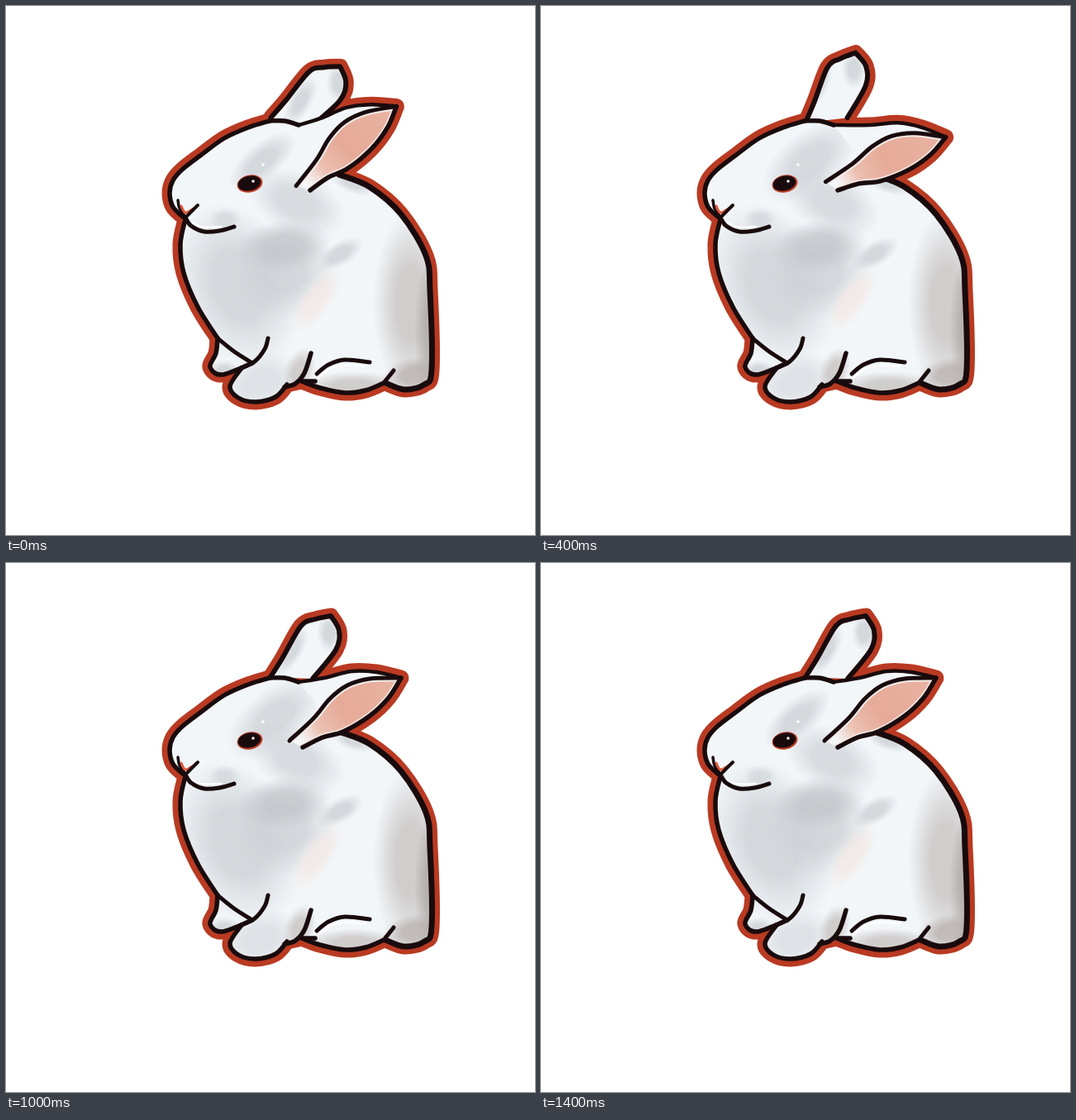
Animation, 640 px wide and 640 px high, one loop 1.6 s. Source, as an HTML page with a canvas:

```html
<!DOCTYPE html>
<html lang="en">
<head>
<meta charset="utf-8">
<title>Rabbit</title>
<style>
html, body { margin: 0; height: 100%; overflow: hidden; background: #fff; }
canvas { display: block; }
</style>
</head>
<body>
<canvas id="stage" width="640" height="640"></canvas>
<script>
const ctx = document.getElementById('stage').getContext('2d');
const INK = '#190b0d', RED = '#b93a22', FUR = '#f2f6f9', SHADE = '#cdd1d5', WARM = '#c8c3c2';
const STEP = 200, SLOTS = 8;

const points = s => s.split(' ').map(p => p.split(',').map(Number));
const reverse = s => s.split(' ').reverse().join(' ');

// Smooth curve through points; "|" marks a corner between curves.
function curve(s) {
  const path = new Path2D();
  s.split('|').forEach((part, n) => {
    const p = points(part), at = i => p[Math.max(0, Math.min(p.length - 1, i))];
    n ? path.lineTo(...p[0]) : path.moveTo(...p[0]);
    for (let i = 0; i < p.length - 1; i++) {
      const [a, b, c, d] = [at(i - 1), at(i), at(i + 1), at(i + 2)];
      path.bezierCurveTo(b[0] + (c[0] - a[0]) / 6, b[1] + (c[1] - a[1]) / 6,
        c[0] - (d[0] - b[0]) / 6, c[1] - (d[1] - b[1]) / 6, ...c);
    }
  });
  return path;
}

// Rotates a curve about a pivot, then shifts it sideways.
function turn(s, [px, py], degrees, shift = 0) {
  const a = degrees * Math.PI / 180, cos = Math.cos(a), sin = Math.sin(a);
  return s.replace(/(\d+),(\d+)/g, (_, x, y) => {
    const u = x - px, v = y - py;
    return `${px + shift + u * cos - v * sin},${py + u * sin + v * cos}`;
  });
}

function line(s, width = 5.5, color = INK) {
  ctx.lineWidth = width;
  ctx.strokeStyle = color;
  ctx.stroke(curve(s));
}

function fill(s, color = FUR) {
  ctx.fillStyle = color;
  ctx.fill(curve(s));
}

function ellipse(x, y, rx, ry, degrees, color) {
  ctx.fillStyle = color;
  ctx.beginPath();
  ctx.ellipse(x, y, rx, ry, degrees * Math.PI / 180, 0, 7);
  ctx.fill();
}

// Ellipse of shadow that fades out towards its rim.
function blob(x, y, rx, ry, degrees = 0, color = SHADE, alpha = .8) {
  ctx.save();
  ctx.translate(x, y);
  ctx.rotate(degrees * Math.PI / 180);
  ctx.scale(rx, ry);
  const fade = ctx.createRadialGradient(0, 0, .4, 0, 0, 1);
  fade.addColorStop(0, color);
  fade.addColorStop(1, color + '00');
  ctx.globalAlpha = alpha;
  ellipse(0, 0, 1, 1, 0, fade);
  ctx.restore();
}

function clipped(s, paint) {
  ctx.save();
  ctx.clip(curve(s));
  paint();
  ctx.restore();
}

const head = '319,139 293,147 264,160 235,181 213,198 202,211 198,226 202,243 214,255';
const chest = '217,258 211,288 215,323 232,364 256,402';
const farFoot = '256,402 254,420 247,437 262,446 298,432';
const paw = '285,438 271,460 281,474 302,479 326,473 340,458';
const sole = '358,454 380,462 410,468 435,465 457,456';
const rump = '459,456 482,464 506,458 515,440 513,345 508,302 478,252 440,219 403,204';
const crown = '354,144 337,139 319,139';
const body = [head, chest, farFoot, paw, sole, rump, crown].join('|');

const backBase = [340, 140], frontBase = [359, 223];
const backEar = '320,138 335,114 357,76 374,68 393,64|393,64 403,82 399,105 371,140';
const outer = '385,139 418,131 448,132 478,139';
const fold = '478,139 440,140 413,148 392,164 372,188 343,215';
const lower = '478,139 463,163 440,185 408,204 383,211 359,223';

function shading(relaxed) {
  blob(280, 338, 72, 104, -22);
  blob(336, 322, 64, 58);
  blob(337, 290, 58, 32, -6, '#bfc3c7', .7);
  blob(404, 300, 32, 15, -30);
  blob(352, 238, 62, 38, 25, SHADE, .7);
  if (relaxed) blob(325, 188, 68, 36, -38, SHADE, .75);
  else blob(310, 188, 50, 22, -40);
  blob(265, 258, 20, 14, 0, SHADE, .6);
  blob(420, 214, 28, 13, 20);
  blob(376, 355, 20, 50, 35, '#f3e9e5');
  blob(490, 360, 46, 112, 0, WARM);
  blob(516, 395, 22, 95, 0, '#aaa2a1', .7);
  blob(496, 446, 42, 22, -10, '#b8b0ae');
  blob(420, 460, 60, 18, 0, WARM);
  blob(308, 455, 52, 34, -20, '#d6d9dd', .7);
  blob(355, 442, 18, 30, 20, WARM);
  blob(264, 442, 20, 14);
  // light beside the hind foot and chin
  line('378,450 390,440 408,435 435,436', 2, '#fff');
  line('224,261 236,267 260,267', 2, '#fff');
}

function innerEar(fold, lower) {
  const inner = fold + '|' + reverse(lower);
  const pink = ctx.createLinearGradient(...points(lower).pop(), ...points(fold)[0]);
  pink.addColorStop(.02, '#f0cdc100');
  pink.addColorStop(.2, '#ecc0b2');
  pink.addColorStop(.45, '#e6aa98');
  pink.addColorStop(1, '#e9b3a3');
  fill(inner, '#f4f6f8');
  fill(inner, pink);
  clipped(inner, () => {
    line(lower, 9, '#f4e6e2');
    line(fold, 9, '#f3ece9');
  });
}

function face() {
  ellipse(295, 215, 15.5, 10.5, -12, '#bd3c25');
  ellipse(294.5, 214.5, 14, 9, -12, INK);
  ellipse(299, 212, 1.8, 1.8, 0, '#eee');
  ellipse(311, 192, 1.8, 1.8, 0, '#fff');
  line('208,235 210,245 217,255', 3.5);
  line('212,242 217,250 227,245', 3, '#e0583c');
  line('232,241 225,248 217,256', 4);
  line('217,256 224,266 240,273 258,272 276,267', 5);
}

function draw(slot) {
  const droop = 2 - Math.abs(slot % 4 - 2);   // 0 raised, 1 halfway, 2 lowered
  const relaxed = droop > 0 && Math.abs(slot - 4) < 3;
  const angle = 9 * (droop - 1), shift = droop ? 0 : 9;
  const front = s => turn(s, frontBase, angle, shift);
  const rear = turn(backEar, backBase, -angle);
  const rim = '354,144 ' + front(outer), edge = front(lower);
  const flap = rim + '|' + edge;

  ctx.clearRect(0, 0, 640, 640);
  ctx.lineCap = ctx.lineJoin = 'round';
  for (const s of [body, rear, flap]) line(s, 19, RED);

  fill(rear);
  const [x, y] = points(rear.split('|')[1])[0];
  clipped(rear, () => {
    blob(x - 2, y + 20, 15, 24);
    blob(x - 48, y + 42, 14, 34, 30);
  });
  line(rear, 6);
  fill(body);
  fill(flap);
  clipped(body, () => shading(relaxed));

  for (const s of [head, chest, farFoot, paw, sole, crown]) line(s);
  line(rump, 7);
  line('256,402 276,418 298,432', 5);
  line('317,402 313,415 301,430 285,438', 5);
  line('337,461 350,457 361,444 369,420');
  line('358,454 374,454');
  line('440,431 410,428 390,434 376,445', 5);
  line('457,456 469,441', 5);
  face();

  innerEar(front(fold), edge);
  line(rim, 4.5);
  line(front(fold), 5);
  line(edge);
}

let shown;
function tick() {
  const slot = Math.floor(performance.now() / STEP) % SLOTS;
  if (slot !== shown) draw(shown = slot);
  requestAnimationFrame(tick);
}
tick();
</script>
</body>
</html>
```
